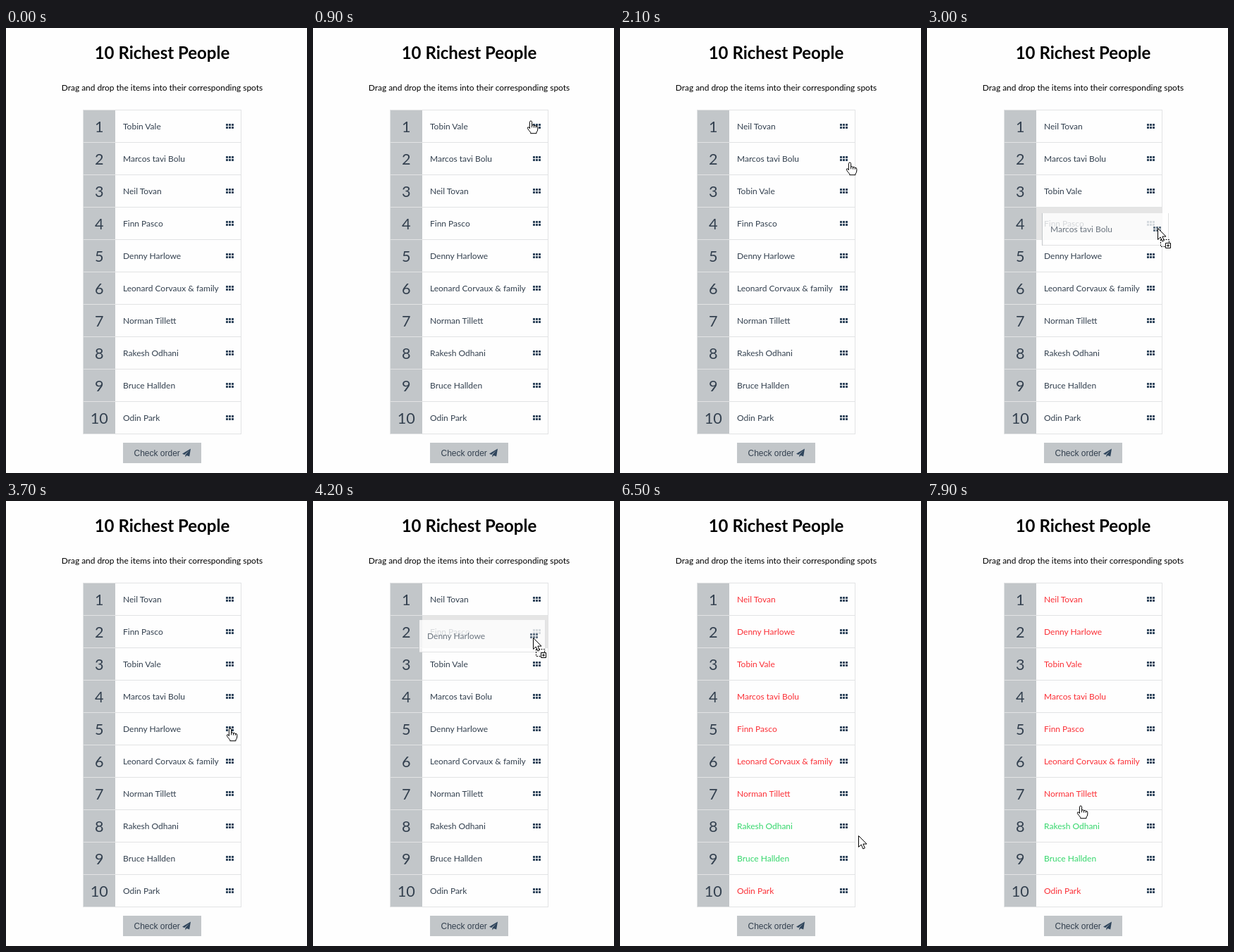
These frames come from a looping animation (427x632 px, 8 s). An HTML page:

```html
<!DOCTYPE html>
<html lang="en">
<head>
<meta charset="utf-8">
<title>10 Richest People</title>
<style>
  html, body { margin: 0; width: 100%; height: 100%; overflow: hidden; background: #fefefe; }
  svg { display: block; width: 427px; height: 632px; }
  text { font-family: Lato, sans-serif; fill: #33404f; }
  .title { font-size: 24px; font-weight: 700; fill: #000; text-anchor: middle; }
  .hint { font-size: 11.9px; fill: #000; text-anchor: middle; }
  .rank { font-size: 21.6px; text-anchor: middle; }
  .name { font-size: 12px; }
  .button { font: 12px "Liberation Sans", Arial, sans-serif; }
  .right { fill: #35d76c; }
  .wrong { fill: #fb2f36; }
  .grey { fill: #c2c6c9; }
  .line { fill: #e2e3e4; }
  .icon { fill: #2f455c; }
  .pointer { fill: #fff; stroke: #000; stroke-linejoin: round; }
</style>
</head>
<body>
<svg viewBox="0 0 427 632">
  <text class="title" x="221.5" y="44">10 Richest People</text>
  <text class="hint" x="221.5" y="89">Drag and drop the items into their corresponding spots</text>
  <g id="list"></g>
  <rect class="grey" x="166" y="589" width="111" height="29"/>
  <text class="button" x="181.5" y="608">Check order</text>
  <path class="icon" transform="translate(250 597.5)" d="M0 7.2L12 0L10.2 11L6.3 9.4L4.4 12V8.8L9.8 2.8L3.1 8.5Z"/>
  <g id="ghost">
    <rect width="179" height="46" fill="#fff" opacity=".8"/>
    <path d="M-.5 0V46" stroke="#c2c6c9"/>
    <path d="M0 45.5H179M178.5 0V46" stroke="#e0e1e2"/>
    <g id="ghost-item" opacity=".72"></g>
  </g>
  <g id="arrow" class="pointer">
    <path d="M.5 .5V16.5L4.2 13L6.8 19L9.4 17.9L6.9 12.1H12Z"/>
    <g id="badge">
      <rect x="4.5" y="16.5" width="12" height="10" fill="none" stroke-dasharray="2 1.5"/>
      <rect x="11.5" y="21.5" width="7" height="7"/>
      <path d="M13 25H17M15 23V27"/>
    </g>
  </g>
  <g id="hand" class="pointer">
    <path d="M-.6 1.5Q-.4 0 1 0Q2.5 0 2.6 1.5V6Q4.4 5.2 5.5 6.6Q7.3 6 8.3 7.4Q10.8 7.1 10.8 9.2V12Q10.6 14.5 9 16V17.7H.7V16.3Q-1.7 13.7-3.6 10.6Q-4 8.5-2.1 8.8L-.6 10.6Z"/>
    <path d="M2.6 6V9.3M5.5 6.6V9.6M8.3 7.4V9.8" fill="none"/>
  </g>
</svg>
<script>
const LOOP = 8000, STEP = 100, CHECKED = 5400;
const LEFT = 155, TOP = 117, PITCH = 46;
const names = ["Tobin Vale", "Marcos tavi Bolu", "Neil Tovan", "Finn Pasco", "Denny Harlowe",
  "Leonard Corvaux & family", "Norman Tillett", "Rakesh Odhani", "Bruce Hallden", "Odin Park"];
const correct = ["Rakesh Odhani", "Bruce Hallden"];

// Dragging row a onto row b swaps the two
const drags = [
  { from: 1100, to: 1700, a: 0, b: 2 },
  { from: 2400, to: 3200, a: 1, b: 3 },
  { from: 4000, to: 4500, a: 4, b: 1 }
];

// The pointer eases to each spot in turn and rests until the next move
const entry = { x: 28, y: -25 };
const moves = [
  { start: 100, end: 1000, x: 318, y: 138 },
  { start: 1000, end: 1300, x: 323, y: 196 },
  { start: 1400, end: 1600, x: 322, y: 224 },
  { start: 1800, end: 2100, x: 325, y: 191 },
  { start: 2100, end: 2300, x: 318, y: 184 },
  { start: 2300, end: 3000, x: 327, y: 284 },
  { start: 3200, end: 3800, x: 316, y: 326 },
  { start: 3900, end: 4200, x: 312, y: 194 },
  { start: 4500, end: 4800, x: 235, y: 640 },
  { start: 4900, end: 5200, x: 235, y: 608 },
  { start: 5800, end: 6300, x: 340, y: 412 },
  { start: 6300, end: 6700, x: 335, y: 538 },
  { start: 6800, end: 7300, x: 318, y: 227 },
  { start: 7500, end: 7900, x: 217, y: 433 }
];

const $ = id => document.getElementById(id);

function add(parent, tag, attrs, text = "") {
  const node = document.createElementNS(parent.namespaceURI, tag);
  for (const key in attrs) node.setAttribute(key, attrs[key]);
  node.textContent = text;
  return parent.appendChild(node);
}

const box = (parent, cls, x, y, width, height) =>
  add(parent, "rect", { class: cls, x, y, width, height });

function addItem(parent, x, y) {
  for (let i = 0; i < 6; i++)
    box(parent, "icon", x + 157 + i % 3 * 4, y + 19 + (i > 2) * 4, 3, 3);
  return add(parent, "text", { class: "name", x: x + 11, y: y + 27 });
}

const list = $("list");
box(list, "line", 109, 116, 225, 461);
const rows = names.map((_, i) => {
  const y = TOP + PITCH * i;
  box(list, "grey", 110, y, 45, PITCH - 1);
  add(list, "text", { class: "rank", x: 132.3, y: y + 31 }, i + 1);
  const cell = box(list, "", LEFT, y, 178, PITCH - 1);
  return { cell, label: addItem(list, LEFT, y) };
});
const ghostLabel = addItem($("ghost-item"), 0, 0);

function pointerAt(t) {
  let { x, y } = entry;
  for (const move of moves) {
    const k = Math.min(1, Math.max(0, (t - move.start) / (move.end - move.start)));
    const eased = k * k * (3 - 2 * k);
    x += (move.x - x) * eased;
    y += (move.y - y) * eased;
  }
  return { x: Math.round(x), y: Math.round(y) };
}

function place(node, visible, x, y) {
  node.style.display = visible ? "" : "none";
  node.setAttribute("transform", `translate(${x} ${y})`);
}

const inside = ({ x, y }, left, top, right, bottom) =>
  x >= left && x < right && y >= top && y < bottom;

function render(t) {
  const order = [...names];
  for (const { to, a, b } of drags)
    if (t >= to) [order[a], order[b]] = [order[b], order[a]];

  const pos = pointerAt(t);
  const drag = drags.find(d => t >= d.from && t < d.to);
  const hovered = drag ? Math.floor((pos.y - TOP) / PITCH) : -1;

  rows.forEach(({ cell, label }, i) => {
    cell.setAttribute("fill", i === hovered ? "#e5e5e5" : "#fefefe");
    label.textContent = order[i];
    const result = t < CHECKED ? "" : correct.includes(order[i]) ? " right" : " wrong";
    label.setAttribute("class", "name" + result);
  });

  $("ghost").style.display = $("badge").style.display = drag ? "" : "none";
  if (drag) {
    const grab = pointerAt(drag.from - STEP);
    ghostLabel.textContent = order[drag.a];
    place($("ghost"), true, LEFT + pos.x - grab.x, TOP + PITCH * drag.a + pos.y - grab.y);
  }

  const clickable = !drag &&
    (inside(pos, 109, 116, 334, 577) || inside(pos, 166, 589, 277, 618));
  place($("hand"), clickable, pos.x, pos.y);
  place($("arrow"), !clickable, pos.x, pos.y);
}

function tick() {
  const t = performance.now() % LOOP;
  render(Math.floor(t / STEP) * STEP);
  requestAnimationFrame(tick);
}
tick();
</script>
</body>
</html>
```
